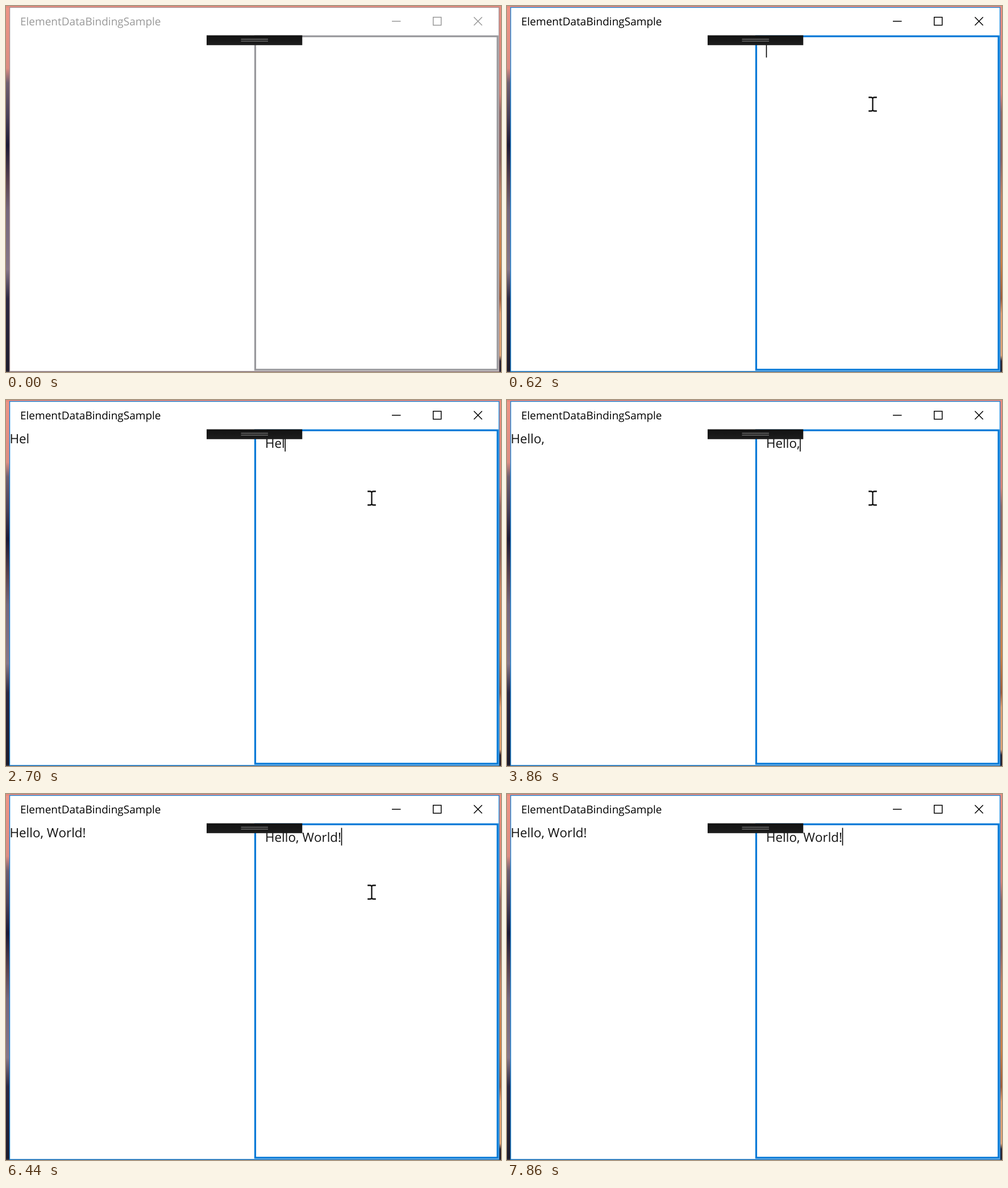
These frames come from a looping animation (871x643 px, 8000 ms). An HTML page:

```html
<!DOCTYPE html>
<html lang="en">
<head>
<meta charset="utf-8">
<title>ElementDataBindingSample</title>
<style>
  html, body { margin: 0; width: 100%; height: 100%; overflow: hidden; }
  svg { display: block; width: 871px; height: 643px; --ink: #999; --edge: #a58f92; --field: #98989c; }
  svg.active { --ink: #000; --edge: #1a84d8; }
  svg.focus { --field: #0078d7; }
  text { font-family: "Open Sans", "Noto Sans", sans-serif; font-kerning: none; white-space: pre; text-rendering: geometricPrecision; }
  .title { font-size: 19px; fill: var(--ink); }
  .body { font-size: 22.4px; fill: #111; }
  .buttons { fill: none; stroke: var(--ink); stroke-width: 1.5; }
</style>
</head>
<body>
<svg id="stage" viewBox="0 0 871 643">
  <defs>
    <linearGradient id="left" x2="0" y2="1">
      <stop offset="0" stop-color="#ee9486"/>
      <stop offset=".17" stop-color="#dd8d82"/>
      <stop offset=".21" stop-color="#6f5f70"/>
      <stop offset=".3" stop-color="#4a4058"/>
      <stop offset=".38" stop-color="#1c1833"/>
      <stop offset=".48" stop-color="#5a4350"/>
      <stop offset=".56" stop-color="#75677c"/>
      <stop offset=".72" stop-color="#867688"/>
      <stop offset=".8" stop-color="#2c2740"/>
      <stop offset="1" stop-color="#1d1b2c"/>
    </linearGradient>
    <linearGradient id="right" x2="0" y2="1">
      <stop offset="0" stop-color="#e88d80"/>
      <stop offset=".24" stop-color="#d98478"/>
      <stop offset=".29" stop-color="#8f6868"/>
      <stop offset=".42" stop-color="#8a625f"/>
      <stop offset=".52" stop-color="#c58263"/>
      <stop offset=".7" stop-color="#d08043"/>
      <stop offset=".8" stop-color="#a05a35"/>
      <stop offset=".84" stop-color="#e5a070"/>
      <stop offset=".955" stop-color="#e0a578"/>
      <stop offset=".97" stop-color="#2a2433"/>
      <stop offset="1" stop-color="#24202e"/>
    </linearGradient>
    <linearGradient id="bar" x2="0" y2="1">
      <stop offset="0" stop-color="#121212"/>
      <stop offset="1" stop-color="#1d1d1d"/>
    </linearGradient>
  </defs>

  <rect width="440" height="643" fill="url(#left)"/>
  <rect x="440" width="431" height="643" fill="url(#right)"/>
  <rect width="871" height="3" fill="#e88b7e"/>
  <rect y="641" width="871" height="2" fill="#37323f"/>

  <rect x="6.5" y="2.5" width="861" height="639.5" fill="#fff" stroke="var(--edge)" stroke-width="1.4"/>
  <text class="title" x="25" y="34">ElementDataBindingSample</text>
  <g class="buttons">
    <path d="M679 26.8H694.5M823.3 19.5L837.7 34M837.7 19.5L823.3 34"/>
    <rect x="751.7" y="19.7" width="14" height="14"/>
  </g>

  <rect x="438.5" y="53.2" width="426.5" height="585.8" fill="#fff" stroke="var(--field)" stroke-width="3.2"/>
  <text class="body" id="echo" x="6.5" y="76"></text>
  <text class="body" id="input" x="456" y="84.3"></text>
  <rect id="caret" y="59.5" width="1.6" height="31"/>

  <rect x="353" y="51.5" width="168.3" height="17.3" fill="url(#bar)"/>
  <path d="M413.5 58.4H461M413.5 61.6H461" stroke="#7c7c7c" stroke-width="1.2"/>

  <g id="beam" fill="none">
    <path d="M-7 -12H-3Q0 -12 0 -9.500Q0 -12 3 -12H7M0 -10V10M-7 12H-3Q0 12 0 9.500Q0 12 3 12H7" stroke="#fff" stroke-width="4"/>
    <path d="M-7.300 -12H-3Q0 -12 0 -9.500Q0 -12 3 -12H7.300M0 -10V10M-7.300 12H-3Q0 12 0 9.500Q0 12 3 12H7.300" stroke="#111" stroke-width="2.300"/>
  </g>

  <g id="lang">
    <rect x="791.3" y="173.3" width="80" height="202.7" fill="#1f1f1f"/>
    <rect x="791.3" y="274.7" width="80" height="93.600" fill="#0078d7"/>
    <rect x="823" y="205" width="30" height="30.500" fill="#fff"/>
    <text x="838" y="231.500" font-size="30" text-anchor="middle">M</text>
    <text x="810.500" y="315" font-size="25.500" font-weight="700" fill="#fff">ENG</text>
  </g>
</svg>
<script>
const LOOP = 8000, STEP = 80;
const REST = [643.5, 172.5], AWAY = [807, 626];
const typing = [
  [0, ""], [2320, "H"], [2470, "He"], [2700, "Hel"], [2930, "Hell"], [3160, "Hello"],
  [3860, "Hello,"], [4110, "Hello, "], [4410, "Hello, W"], [4590, "Hello, Wo"],
  [4650, "Hello, Wor"], [4820, "Hello, World"], [5750, "Hello, World1"],
  [6220, "Hello, World"], [6440, "Hello, World!"]
];
const el = id => document.getElementById(id);
const stage = el("stage"), echo = el("echo"), input = el("input");
const caret = el("caret"), beam = el("beam"), lang = el("lang");

const show = (node, on) => node.setAttribute("visibility", on ? "visible" : "hidden");
const smooth = p => p * p * (3 - 2 * p);
const glide = (from, to, p) => from.map((v, i) => v + (to[i] - v) * smooth(p));

// The pointer is sampled in coarse steps, so it hops along its path.
function pointer(t) {
  if (t < 70 || t >= 7860) return null;
  const progress = start => Math.min(1, (Math.floor((t - start) / STEP) + 1) / 6);
  if (t < 620) return glide(AWAY, REST, progress(70));
  return t < 7370 ? REST : glide(REST, AWAY, progress(7370));
}

function render(t) {
  stage.classList.toggle("active", t >= 470);
  stage.classList.toggle("focus", t >= 540);

  const text = typing.findLast(([at]) => t >= at)[1];
  if (input.textContent !== text) input.textContent = echo.textContent = text;
  caret.setAttribute("x", 455.7 + (text ? input.getComputedTextLength() : 0));
  show(caret, t >= 540);

  const pos = pointer(t);
  show(beam, pos);
  if (pos) beam.setAttribute("transform", `translate(${pos})`);
  show(lang, t >= 1930 && t < 2010);
}

function tick() {
  render(performance.now() % LOOP);
  requestAnimationFrame(tick);
}
tick();
</script>
</body>
</html>
```
